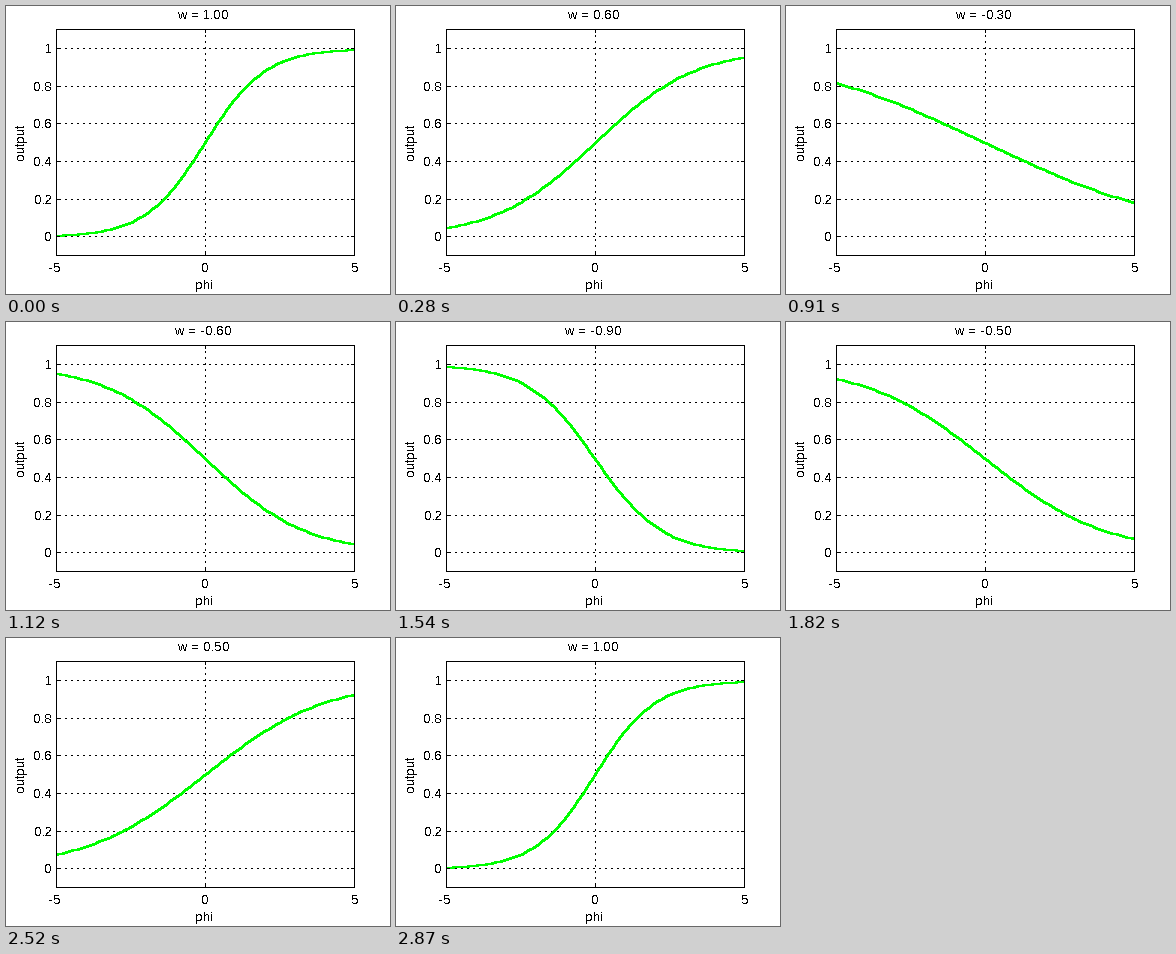
These frames come from a looping animation (384x288 px, 2940 ms). A matplotlib script:

```python
import numpy as np
import matplotlib.pyplot as plt
from matplotlib.animation import FuncAnimation
from matplotlib.patches import Rectangle

W, H, DPI = 384, 288, 96
PX = 72 / DPI
LEFT, RIGHT, TOP, BOTTOM = 50, 348, 23, 249
STEPS = 21

plt.rcParams.update({
    "font.family": "Liberation Sans",
    "font.size": 13 * PX,
    "text.antialiased": False,
    "text.hinting": "force_autohint",
    "text.hinting_factor": 1,
})

fig = plt.figure(figsize=(W / DPI, H / DPI), dpi=DPI, facecolor="white")
ax = fig.add_axes([0, 0, 1, 1])
ax.set(xlim=(0, W), ylim=(H, 0))
ax.axis("off")


def px(x):
    return np.floor(LEFT + (x + 5) / 10 * (RIGHT - LEFT) + 0.5)


def py(y):
    return np.floor(BOTTOM - (y + 0.1) / 1.2 * (BOTTOM - TOP) + 0.5)


def line(xs, ys, **kw):
    ax.plot(xs, ys, color="black", lw=PX, antialiased=False, snap=False,
            solid_capstyle="butt", dash_capstyle="butt", **kw)


def label(x, y, s, ha="center", va="baseline", **kw):
    return ax.text(x, y, s, ha=ha, va=va, color="black", **kw)


dots = dict(linestyle=(0, (1, 4)), zorder=1)

# Lines run through pixel centres so that each covers one pixel row or column.
for v in (0, 0.2, 0.4, 0.6, 0.8, 1):
    y = py(v) + 0.5
    line([RIGHT + 1, LEFT], [y, y], **dots)
    line([LEFT, LEFT + 4], [y, y], zorder=4)
    line([RIGHT - 3, RIGHT + 1], [y, y], zorder=4)
    label(46, y + 4.5, f"{v:g}", ha="right")

for v in (-5, 0, 5):
    x = px(v) + 0.5
    if v == 0:
        line([x, x], [TOP, BOTTOM + 1], **dots)
    line([x, x], [TOP, TOP + 4], zorder=4)
    line([x, x], [BOTTOM - 3, BOTTOM + 1], zorder=4)
    label(x - (2 if v < 0 else 0), 266, f"{v}")

ax.add_patch(Rectangle((LEFT + 0.5, TOP + 0.5), RIGHT - LEFT, BOTTOM - TOP,
                       fill=False, ec="black", lw=PX, antialiased=False,
                       snap=False, zorder=4))
label(198, 283, "phi")
label(15, 136, "output", va="center", rotation=90)
title = label(198, 13, "")

phi = np.linspace(-5, 5, 101)
curve, = ax.plot([], [], color="#00ff00", lw=1.6 * PX, antialiased=False,
                 snap=False, zorder=3)
curve.set_clip_path(Rectangle((LEFT + 1, TOP + 1), RIGHT - LEFT - 1,
                              BOTTOM - TOP - 1, transform=ax.transData))


def update(i):
    down, k = i < STEPS, i % STEPS
    w = (10 - k if down else k - 10) / 10
    curve.set_data(px(phi) + 0.25, py(1 / (1 + np.exp(-w * phi))) + 1)
    title.set_text(f"w = {w:.2f}")
    return curve, title


anim = FuncAnimation(fig, update, frames=2 * STEPS, interval=70,
                     repeat=True, repeat_delay=0, blit=False)
plt.show()
```
